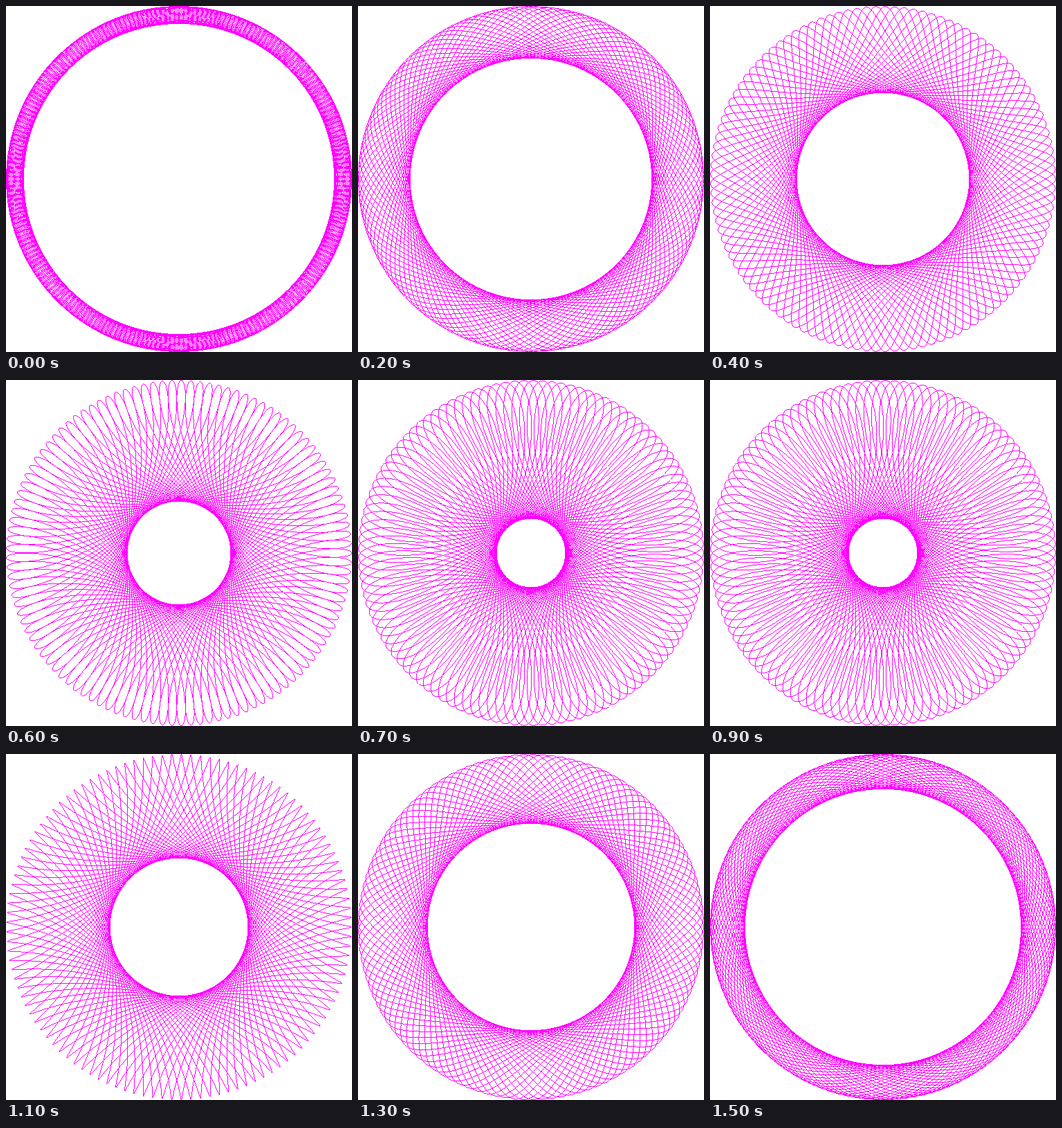
An HTML page with a canvas that plays this animation: 500 by 500 pixels, repeating every 1600 ms.

```html
<!DOCTYPE html>
<html lang="en">
<head>
<meta charset="utf-8">
<title>Spirograph</title>
<style>
  html, body { margin: 0; width: 100%; height: 100%; overflow: hidden; background: #fff; }
  canvas { display: block; width: 500px; height: 500px; image-rendering: pixelated; }
</style>
</head>
<body>
<canvas id="stage" width="500" height="500"></canvas>
<script>
const SIZE = 500;
const MID = (SIZE - 1) / 2;
const STEP_MS = 100;
const STEPS = 16;
const TURNS = 35;         // turns of the large arm
const COUNTER_TURNS = 78; // turns of the pen arm, the other way
const SEGMENTS = (TURNS + COUNTER_TURNS) * 80;
const MAGENTA = 0xffff00ff;
const WHITE = 0xffffffff;

const ctx = document.getElementById('stage').getContext('2d');
const image = ctx.createImageData(SIZE, SIZE);
const pixels = new Uint32Array(image.data.buffer);

function plot(x, y) {
  if (x >= 0 && y >= 0 && x < SIZE && y < SIZE) pixels[y * SIZE + x] = MAGENTA;
}

// Thin line without smoothing: one pixel per step along the longer axis.
function line(x0, y0, x1, y1) {
  const steep = Math.abs(y1 - y0) > Math.abs(x1 - x0);
  if (steep) [x0, y0, x1, y1] = [y0, x0, y1, x1];
  if (x0 > x1) [x0, x1, y0, y1] = [x1, x0, y1, y0];
  const slope = (y1 - y0) / (x1 - x0);
  for (let x = Math.ceil(x0); x <= x1; x++) {
    const y = Math.round(y0 + (x - x0) * slope);
    if (steep) plot(y, x); else plot(x, y);
  }
}

function curvePoint(i, pen) {
  const t = 2 * Math.PI * i / SEGMENTS;
  const arm = 1 - pen;
  return [
    MID + MID * (arm * Math.cos(TURNS * t) + pen * Math.cos(COUNTER_TURNS * t)),
    MID - MID * (arm * Math.sin(TURNS * t) - pen * Math.sin(COUNTER_TURNS * t))
  ];
}

function draw(step) {
  const level = Math.min(step, STEPS - step);
  const pen = 0.05 * (level + 1);
  pixels.fill(WHITE);
  let last = curvePoint(0, pen);
  for (let i = 1; i <= SEGMENTS; i++) {
    const next = curvePoint(i, pen);
    line(...last, ...next);
    last = next;
  }
  ctx.putImageData(image, 0, 0);
}

let shown = -1;
function tick(now) {
  const step = Math.floor(now / STEP_MS) % STEPS;
  if (step !== shown) draw(shown = step);
  requestAnimationFrame(tick);
}
tick(performance.now());
</script>
</body>
</html>
```
